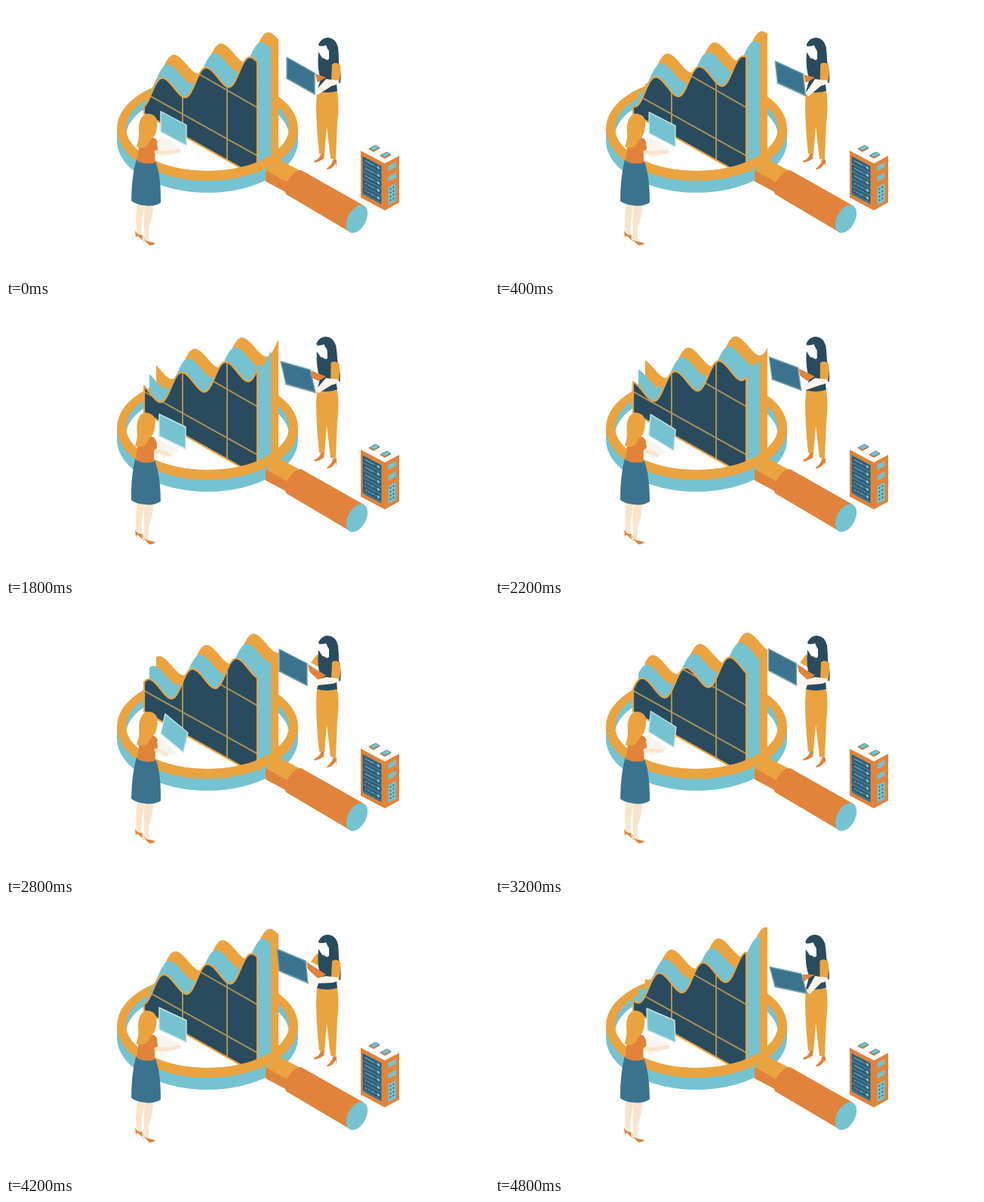
An HTML page with a canvas that plays this animation: 640x360 px, repeating every 5 s.

```html
<!DOCTYPE html>
<html lang="en">
<head>
<meta charset="utf-8">
<title>Data analysis</title>
<style>
html, body { margin: 0; width: 100%; height: 100%; overflow: hidden; background: #fff; }
canvas { display: block; width: 640px; height: 360px; }
</style>
</head>
<body>
<canvas></canvas>
<script>
const GOLD = '#eba33f', RUST = '#e1833a', TEAL = '#75c3d0', NAVY = '#294b5d',
      BLUE = '#3b738e', LINE = '#ad9157', SKIN = '#f9e4cb', PALE = '#fdf5ea', WHITE = '#fff';
const canvas = document.querySelector('canvas');
const ratio = window.devicePixelRatio || 1;
canvas.width = 640 * ratio;
canvas.height = 360 * ratio;
const c = canvas.getContext('2d');
c.scale(ratio, ratio);
c.lineCap = c.lineJoin = 'round';

function shape(d, fill, stroke, width = 1) {
  const p = new Path2D(d);
  if (fill) { c.fillStyle = fill; c.fill(p, 'evenodd'); }
  if (stroke) { c.strokeStyle = stroke; c.lineWidth = width; c.stroke(p); }
}
function ellipse(x, y, rx, ry, fill, angle = 0) {
  c.beginPath();
  c.ellipse(x, y, rx, ry, angle, 0, 7);
  c.fillStyle = fill;
  c.fill();
}
const oval = (x, y, rx, ry) => `M${x - rx},${y}a${rx},${ry} 0 1 0 ${2 * rx},0a${rx},${ry} 0 1 0 ${-2 * rx},0Z`;
function group(setup, draw) {
  c.save();
  setup();
  draw();
  c.restore();
}
const clip = d => () => c.clip(new Path2D(d));
const skew = (k, x, y) => () => c.transform(1, k, 0, 1, x, y);
const turn = (deg, x, y) => () => { c.translate(x, y); c.rotate(deg * Math.PI / 180); c.translate(-x, -y); };

// Poses at the given seconds, linear in between
const TIMES = [0, 1, 1.8, 2.8, 3.6, 4.2, 4.8];
function pose(keys, s) {
  let i = 0;
  while (i < TIMES.length - 2 && s > TIMES[i + 1]) i++;
  const u = (s - TIMES[i]) / (TIMES[i + 1] - TIMES[i]);
  return keys[i].map((v, k) => v + (keys[i + 1][k] - v) * u);
}
// Screens: top left, top right, bottom left
const SCREEN_R = [
  [372, 68, 409, 89, 372, 96], [370, 81, 407, 92, 378, 111], [364, 75, 403, 86, 371, 105],
  [362, 60, 399, 79, 362, 89], [363, 59, 400, 79, 363, 87], [359, 61, 397, 77, 362, 90],
  [364, 85, 406, 94, 371, 111]];
const SCREEN_L = [
  [205, 140, 239, 158, 205, 167], [203, 143, 239, 161, 203, 172], [203, 145, 238, 162, 203, 174],
  [211, 146, 241, 171, 205, 172], [202, 139, 239, 156, 202, 167], [203, 139, 239, 156, 203, 168],
  [201, 140, 238, 156, 202, 169]];
const HAND_L = [[231, 192], [229, 196], [219, 199], [214, 200], [232, 190], [231, 191], [231, 191]];
// Lean in degrees: right woman, left woman
const LEAN = [[0, .6], [-3, -.8], [-2.5, -.8], [0, .8], [0, .2], [0, .2], [-2.5, -.4]];

function screen([x, y, x2, y2, x3, y3], fill, edge) {
  shape(`M${x},${y}L${x2},${y2}L${x2 + x3 - x},${y2 + y3 - y}L${x3},${y3}Z`, fill, edge, 1.4);
}

// Travelling wave on a rising slope, falling slower than it climbs
function wave(s, x0, x1, peakX, peakY, period, base, fill) {
  let d = '';
  for (let x = x0; x <= x1; x++) {
    const a = 2 * Math.PI * ((x - peakX) / period - .2464 * s);
    const y = peakY - .238 * (x - peakX) + 16.6 * (1 - Math.cos(a - .18 * (1 - Math.cos(a))));
    d += `${d ? 'L' : 'M'}${x},${y.toFixed(2)}`;
  }
  d += base + 'Z';
  shape(d, fill);
  return d;
}

const HOLE = oval(267, 162, 108, 57);
const RING = oval(267, 163, 120, 69) + HOLE;

function glass(s) {
  ellipse(267, 179, 120, 69, TEAL);
  c.fillRect(147, 163, 240, 16);
  ellipse(267, 163, 120, 69, GOLD);
  group(clip(HOLE), () => {
    ellipse(267, 162, 108, 57, TEAL);
    ellipse(267, 173, 108, 57, WHITE);
  });

  wave(s, 199, 361, 283.5, 50, 62.5, 'V203L351,206L199,125', GOLD);
  wave(s, 190, 351, 275, 63, 62, 'V205L333,207L190,130', TEAL);
  const front = wave(s, 183, 333, 264, 82, 58, 'V212L311,215L183,143', NAVY);
  group(clip(front), () => shape('M234,60V220M293,60V220M183,115L333,199M220,70L333,135', null, LINE, 2));
  shape(front, null, GOLD, 2.2);

  group(clip('M140,180H400V260H140Z'), () => shape(RING, GOLD));

  shape('M344,218L362,204L392,220L373,236Z', GOLD);
  shape('M344,218L374,235V249L344,233Z', RUST);
  shape('M391,218L474,265L457,301L371,250Q367,243 374,231Q382,218 391,218Z', RUST);
  ellipse(465, 283, 12, 20, TEAL, .49);
}

function server(s) {
  group(skew(.53, 470, 192), () => {
    shape('M0,0H32V62.5H0Z', RUST);
    shape('M2.5,6H27.5V57H2.5Z', BLUE);
    for (let i = 0; i < 5; i++) {
      const y = 8 + i * 10;
      shape(`M4,${y}H26V${y + 5}H4Z`, null, NAVY, 1.3);
      shape(`M6,${y + 2.5}h11`, null, '#91aebb', .8);
      shape(oval(23.5, y + 2.5, 1.8, 1.9), TEAL);
      if (i > 2) shape(`M${8 + (i + Math.round(s * 5)) % 2},${y + 2.5}h.1m4,0h.1`, null, NAVY, 1.6);
    }
  });
  group(skew(-.55, 502, 209), () => {
    shape('M0,0H19V62.5H0Z', RUST);
    shape('M4.5,6H14.5V13H4.5ZM4.5,20H14.5V27H4.5ZM4.5,34H14.5V58H4.5Z', TEAL);
    for (let i = 0; i < 8; i++) ellipse(7.5 + i % 2 * 4, 38 + (i >> 1) * 5, .9, 1, NAVY);
  });
  shape('M470,192L489,182L521,199L502,209Z', WHITE);
  for (const [x, y] of [[488, 189], [503, 198]]) {
    shape(`M${x - 8},${y + 1}l9,-5 l7,4 l-9,5Z`, RUST);
    shape(`M${x - 6},${y}l8,-4 l5,3 l-8,4Z`, TEAL, '#527684', .7);
  }
}

function rightWoman(s) {
  const lap = pose(SCREEN_R, s), [x1, y1, x2, y2, x3, y3] = lap;
  const [lean] = pose(LEAN, s);
  const handX = x2 + x3 - x1, handY = y2 + y3 - y1;

  shape('M416,190H421L420,200L416,202ZM430,198H437L436,206L431,207Z', SKIN);
  shape('M408,206Q416,203 418,195L422,195L421,203Q415,207 409,208ZM425,216Q432,211 434,203L438,204V215L437,209Q431,218 425,217Z', RUST);
  shape('M412,112Q426,117 439,113Q442,133 439,155L437,203H430L425,160L422,196H415Q411,160 411,130Z', GOLD);

  group(turn(lean, 425, 114), () => {
    shape('M414,51Q418,42 427,42Q437,43 440,55Q441,66 441,75Q445,90 443,103Q437,98 435,86L422,72Z', NAVY);
    if (y2 < 83) shape('M404,78L412,67L419,72L415,84Z', GOLD);
    shape('M414,61L419,69L428,72L433,72L438,75Q440,84 437,94L439,113Q426,117 412,113L417,97Q412,84 414,61Z', NAVY);
    shape('M415,53Q421,54 424,52Q426,57 428,60L428,70Q426,74 421,69Q416,67 415,53Z', WHITE);
    shape('M432,77Q438,73 443,79Q444,92 441,102L431,99Z', GOLD);
  });

  // Sleeve, then the forearm reaching to the screen's lower corner
  shape(`M${x2 + 1},${y2 + 1}L424,95L414,101L${x2 + 3},${y2 + 11}Z`, RUST);
  shape(`M441,99Q440,105 432,106L${handX + 4},${handY + 1}L${handX},${handY - 3}L424,97L432,98Z`, PALE);
  shape(`M${x3},${y3}L${handX},${handY}`, null, LINE, 2);
  screen(lap, BLUE, '#72a5b5');
}

function leftWoman(s) {
  const lap = pose(SCREEN_L, s), [x1, y1, x2, y2, x3, y3] = lap;
  const [hx, hy] = pose(HAND_L, s), lean = pose(LEAN, s)[1];

  shape('M174,262H184L180,285L179,305L173,303Q171,280 174,262ZM184,263H195Q195,280 189,295V314L184,310Q181,288 184,263Z', SKIN);
  shape('M171,298Q174,305 180,304L184,310L182,312L174,305L172,308ZM180,305Q184,313 190,313L198,315Q196,318 190,318L183,311L182,314Z', RUST);

  group(turn(lean, 186, 264), () => {
    shape('M172,204Q185,210 198,207Q205,226 205,261Q196,267 184,265Q172,264 166,259Q166,227 172,204Z', BLUE);
    shape('M176,180Q188,171 197,176Q202,181 201,190L197,195V208Q185,212 173,206Z', RUST);
    shape('M177,151Q180,143 188,143Q197,144 199,152Q200,163 196,172Q190,178 186,186Q180,190 172,187Q176,176 175,168Q174,158 177,151Z', GOLD);
  });

  shape(`M200,183L${x3},${y3 + 5}L${x2 + x3 - x1 - 8},${y2 + y3 - y1 + 2}L${hx - 8},${hy + 4}L204,203Z`, '#f7f5f2');
  shape(`M199,194Q210,196 ${hx - 2},${hy}`, null, SKIN, 5);
  screen(lap, TEAL, '#c8e5e8');
}

const start = performance.now();
function frame() {
  const s = Math.floor((performance.now() - start) % 5000 / 200) * .2;
  c.clearRect(0, 0, 640, 360);
  glass(s);
  server(s);
  rightWoman(s);
  leftWoman(s);
  requestAnimationFrame(frame);
}
frame();
</script>
</body>
</html>
```
